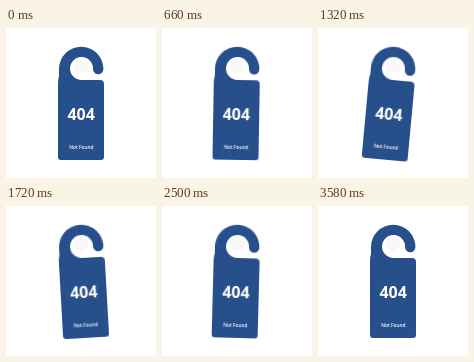
Animation of 150 by 150 pixels, one loop 4.2 s. Source, as an HTML page:

```html
<!DOCTYPE html>
<html lang="en">
<head>
<meta charset="utf-8">
<title>404 Not Found</title>
<style>
  html, body { margin: 0; width: 100%; height: 100%; overflow: hidden; background: #fff; }
  svg { display: block; width: 100vw; height: 100vh; }
  #tag { transform-origin: 75px 40px; }
  text { fill: #fff; font-family: "Open Sans", "Noto Sans", sans-serif; font-weight: 700; text-anchor: middle; }
  .note { font-weight: 600; }
</style>
</head>
<body>
<svg viewBox="0 0 150 150">
  <circle cx="75" cy="38" r="7" fill="#f9f7f7"/>
  <g id="tag">
    <path fill="#274f8b" d="M52 55 Q52 51 53 48 V41
      A22.2 22.2 0 0 1 97.4 41 A5.2 5.2 0 0 1 87 41
      A11.5 11.5 0 1 0 75.5 52 H94 Q98 52 98 56
      V129 Q98 132 95 132 H55 Q52 132 52 129 Z"/>
    <text x="75.2" y="92.3" font-size="16">404</text>
    <text class="note" x="75.4" y="120.7" font-size="4.8">Not Found</text>
  </g>
</svg>
<script>
  const LOOP = 4200, START = 285, STEP = 277.5;
  const swings = [0, -14.9, 11.2, -7.9, 5.8, -4, 2.9, -2.1, 1.5, -1.1, 0.8, -0.5, 0];
  const pose = (deg, ms) => ({
    transform: `rotate(${deg}deg)`,
    offset: ms / LOOP,
    easing: 'cubic-bezier(.4, 0, .1, 1)'
  });

  const tag = document.getElementById('tag');
  tag.animate(
    [pose(0, 0), ...swings.map((deg, i) => pose(deg, START + i * STEP)), pose(0, LOOP)],
    { duration: LOOP, iterations: Infinity }
  );
</script>
</body>
</html>
```
